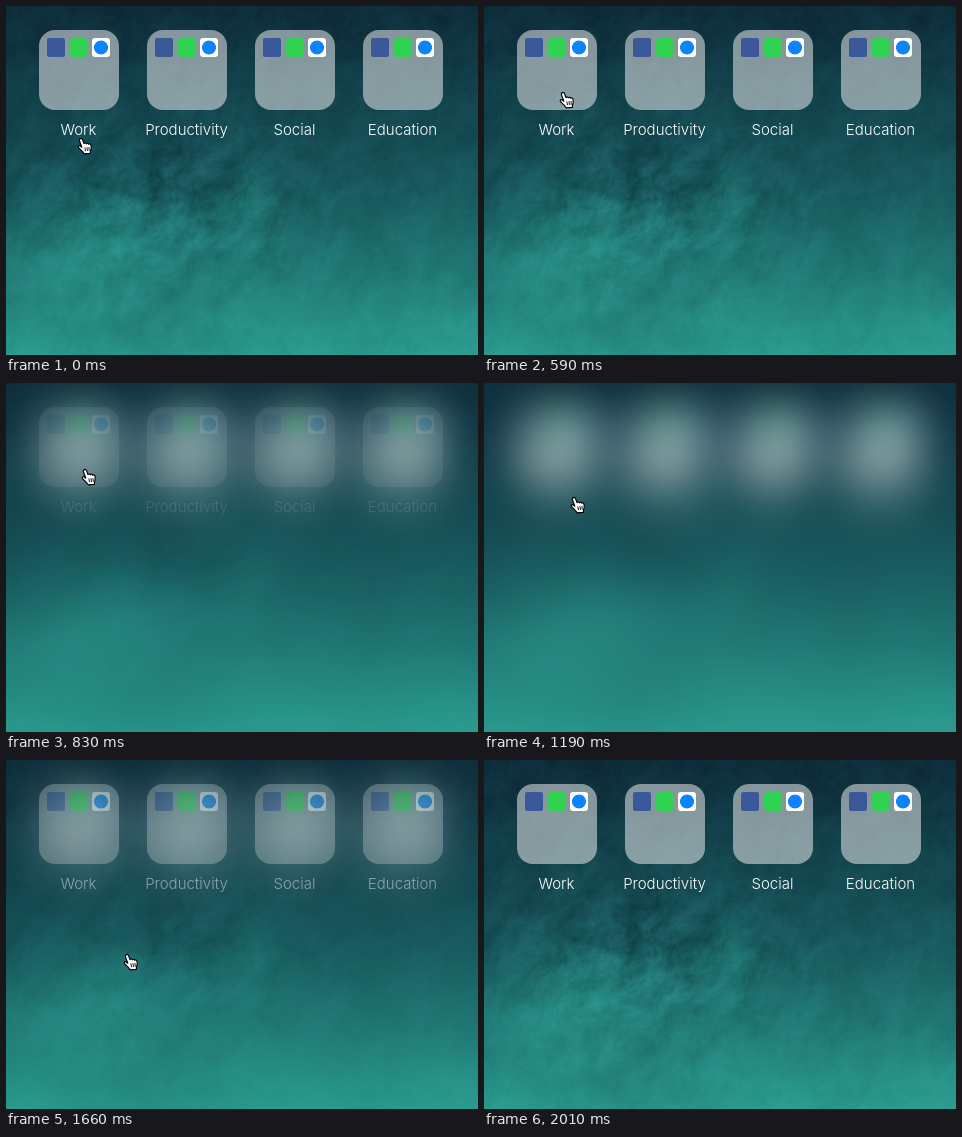
An HTML page with a canvas for the animation above (2.46 s loop, 472 by 349 pixels).

```html
<!DOCTYPE html>
<html lang="en">
<head>
<meta charset="utf-8">
<title>Folders</title>
<style>
  html, body { margin: 0; width: 100%; height: 100%; overflow: hidden; background: #1c5f6a; }
  #stage { position: relative; width: 472px; height: 349px; overflow: hidden; }
  .scene { position: absolute; left: 0; top: 0; width: 472px; height: 349px; }
  .scene canvas { position: absolute; left: -72px; top: -72px; }
  .soft { filter: blur(22px); opacity: 0; }
  .folder {
    position: absolute; top: 24px; width: 80px; height: 80px;
    border-radius: 16px; background: rgba(248, 246, 247, .51);
  }
  .app { position: absolute; top: 8px; width: 18px; height: 19px; }
  .app:nth-child(1) { left: 8px; border-radius: 2px; background: #3b5998; }
  .app:nth-child(2) { left: 31px; border-radius: 4px; background: #2fd251; }
  .app:nth-child(3) { left: 53px; border-radius: 3px; background: radial-gradient(circle, #0a84ff 6.6px, #fff 7.3px); }
  .label {
    position: absolute; left: -20px; top: 90px; width: 119px; text-align: center;
    font: 300 15px/20px Inter, sans-serif; color: #fff;
  }
  #hand { position: absolute; left: 0; top: 0; }
</style>
</head>
<body>
<div id="stage">
  <svg id="hand" width="16" height="18" viewBox="0 0 16 18" stroke="#000" stroke-linejoin="round" stroke-linecap="round">
    <path fill="#fff" stroke-width="1.2" d="M2.4 3.6C1.9 1.6 4.7.6 5.5 2.6L7 6.6C7.5 5.5 9 5.7 9.4 6.8 10 5.9 11.3 6.1 11.7 7.2 12.4 6.6 13.7 7 14 8.2 14.6 10.4 14.6 12 13.5 14L13.3 16.4 7.2 16.8C6.3 15 3.8 12.8 1.6 10.7.6 9.4 1.9 8.1 3.3 9L4.8 10.2Z"/>
    <path fill="none" stroke-width=".9" d="M7.9 10.8l.6 3M10 10.6l.4 3M12 10.4l.2 3"/>
  </svg>
</div>
<script>
const W = 472, H = 349, PAD = 72;
const LOOP = 2460, TICK = 118;
const stage = document.getElementById('stage');
const hand = document.getElementById('hand');

const mix = (a, b, t) => a + (b - a) * t;
const clamp = t => Math.min(1, Math.max(0, t));
const smooth = t => t * t * (3 - 2 * t);
const bell = (x, y, cx, cy, rx, ry) => Math.exp(-(((x - cx) / rx) ** 2) - ((y - cy) / ry) ** 2);

// seeded value noise
let seed = 7;
const rand = () => (seed = (seed * 1664525 + 1013904223) >>> 0) / 4294967296;
const grid = Float32Array.from({ length: 65536 }, rand);
const cell = (x, y) => grid[(y & 255) * 256 + (x & 255)];

function noise(x, y) {
  const i = Math.floor(x), j = Math.floor(y), u = smooth(x - i), v = smooth(y - j);
  return mix(mix(cell(i, j), cell(i + 1, j), u), mix(cell(i, j + 1), cell(i + 1, j + 1), u), v) - .5;
}

// mottled water, drawn out along the rising diagonal
function foam(x, y) {
  const along = (x - y) / 1.4, across = x + y;
  let sum = 0, weight = 1;
  for (let size = 30; size > 1.5; size /= 2) {
    sum += weight * noise(along / size + size, across / size);
    weight *= .75;
  }
  return sum;
}

const deep = [13, 44, 57], mid = [24, 88, 93], pale = [43, 159, 144];

// the sea brightens downwards, lifted at the crest and the cloud of spray
function depth(x, y) {
  return y + 45 * bell(x, y, 240, 190, 28, 50) + 42 * bell(x, y, 90, 240, 75, 60)
    - 28 * bell(x, y, 185, 155, 45, 20) - 30 * bell(x, y, 140, 325, 90, 40)
    - 22 * bell(x, y, 0, 150, 60, 70);
}

function paintSea() {
  const c = document.createElement('canvas');
  c.width = W + 2 * PAD;
  c.height = H + 2 * PAD;
  const g = c.getContext('2d'), img = g.createImageData(c.width, c.height);
  for (let i = 0; i < c.width * c.height; i++) {
    const x = i % c.width - PAD, y = Math.floor(i / c.width) - PAD;
    const sway = 16 * noise(x / 28, y / 28);
    const light = foam(x + sway, y) * (9 + 22 * bell(x, y, 160, 200, 120, 70));
    const t = clamp(depth(x + sway, y + sway) / 360) * 2;
    for (let k = 0; k < 3; k++) {
      const base = t < 1 ? mix(deep[k], mid[k], t) : mix(mid[k], pale[k], t - 1);
      img.data[4 * i + k] = base + light * (k ? .9 : .4);
    }
    img.data[4 * i + 3] = 255;
  }
  g.putImageData(img, 0, 0);
  return c;
}

function add(parent, name, text = '') {
  const el = document.createElement('div');
  el.className = name;
  el.textContent = text;
  parent.appendChild(el);
  return el;
}

function buildScene(sea, name) {
  const scene = add(stage, name);
  scene.appendChild(sea);
  ['Work', 'Productivity', 'Social', 'Education'].forEach((title, i) => {
    const folder = add(scene, 'folder');
    folder.style.left = 33 + 108 * i + 'px';
    for (let k = 0; k < 3; k++) add(folder, 'app');
    add(folder, 'label', title);
  });
  return scene;
}

const sea = paintSea();
const copy = sea.cloneNode();
copy.getContext('2d').drawImage(sea, 0, 0);

buildScene(sea, 'scene');
const soft = buildScene(copy, 'scene soft');
soft.setAttribute('aria-hidden', 'true');
stage.appendChild(hand);

// progress between two ticks
const part = (n, from, to) => clamp((n - from) / (to - from));

function blurAt(n) {
  const off = (1 - part(n, 13, 17)) ** 2;
  return n < 13 ? 1 - (1 - part(n, 5, 8)) ** 2 : off;
}

function handAt(n) {
  const reach = smooth(part(n, 1, 5)), drag = smooth(part(n, 9, 12)), leave = part(n, 14, 17);
  return [71 + 4 * reach + 42 * drag + 33 * leave, 131 - 46 * reach + 108 * drag + 177 * leave];
}

// the picture holds still within each tick
function play(el, pose) {
  const frames = [];
  for (let n = 0; n * TICK < LOOP; n++) {
    frames.push({ offset: n * TICK / LOOP, easing: 'step-end', ...pose(n) });
  }
  frames.push({ ...frames[frames.length - 1], offset: 1 });
  el.animate(frames, { duration: LOOP, iterations: Infinity });
}

play(soft, n => ({ opacity: blurAt(n) }));
play(hand, n => {
  const [x, y] = handAt(n).map(Math.round);
  return { transform: `translate(${x}px, ${y}px)` };
});
</script>
</body>
</html>
```
